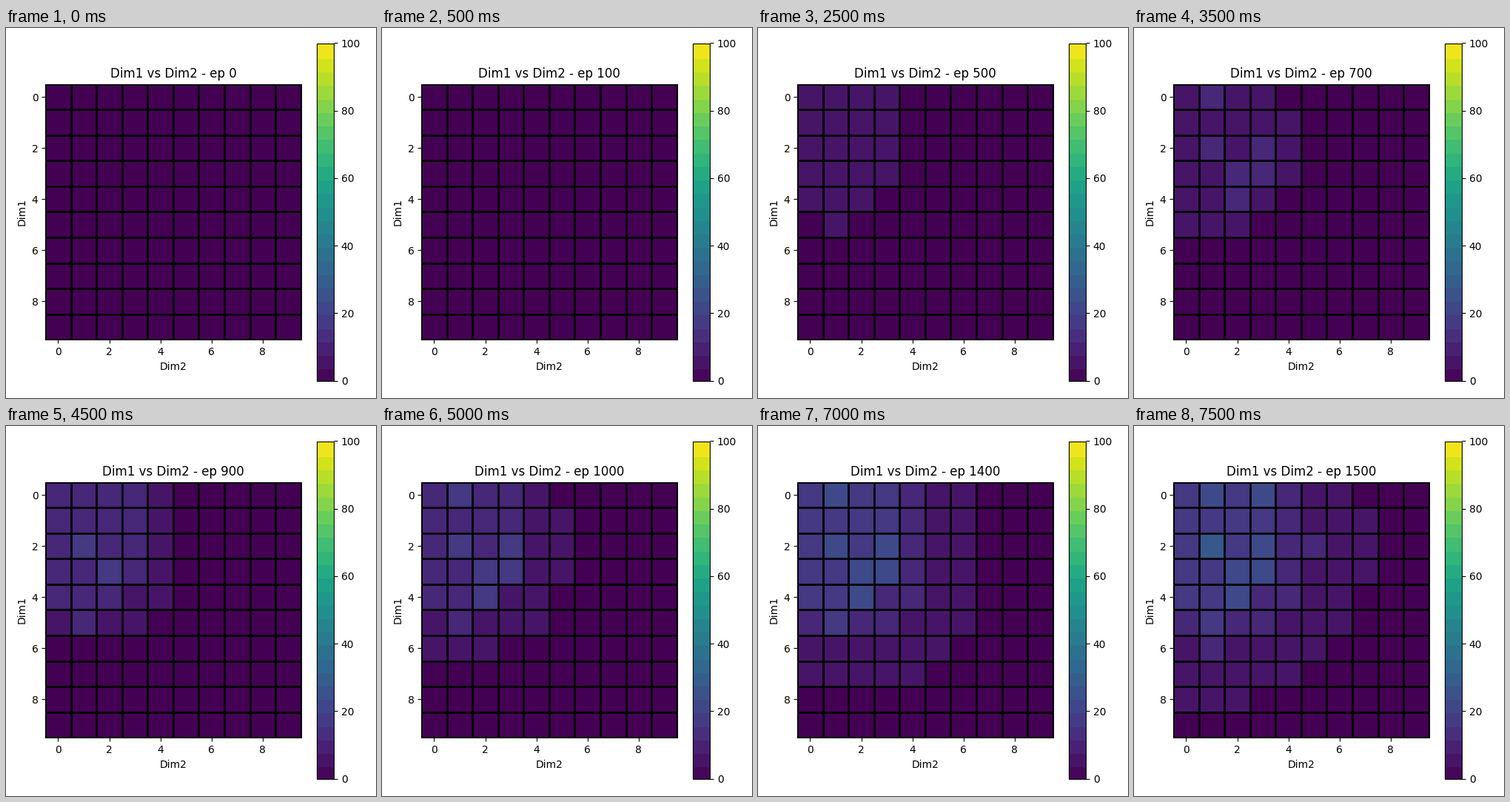
Animation, 500 px wide and 500 px high, one loop 8 s. Source, as a matplotlib script:

```python
import numpy as np
import matplotlib.pyplot as plt
from matplotlib.animation import FuncAnimation

N = 10
STEPS = 16
LEVEL = 5.5  # percent gained at each rise
FAVOURED = [(2, 1), (0, 1), (0, 3), (2, 3), (3, 2), (3, 3), (4, 2), (5, 1)]

# Cells light up along a front that spreads from row 2, column 1,
# then rise again at a pace that slows with distance.
row, col = np.mgrid[:N, :N]
dist = np.hypot(row - 2, col - 1)
lag = 2.65 * np.maximum(dist - 1.7, 0)
start = 3 + lag
pace = 4 + dist ** 2 / 10

# Favoured cells start sooner and rise faster
hot = tuple(np.transpose(FAVOURED))
start[hot] = 2 + 0.4 * lag[hot]
pace[hot] *= 0.8


def heat(step):
    rises = 1 + np.floor((step - start) / pace)
    return LEVEL * np.maximum(rises, 0)


plt.rcParams["font.family"] = "DejaVu Sans"
fig, ax = plt.subplots(figsize=(5, 5), dpi=100, facecolor="white")
image = ax.imshow(heat(0), cmap="viridis", vmin=0, vmax=100,
                  interpolation="nearest")
ax.set_xticks(range(0, N, 2))
ax.set_yticks(range(0, N, 2))
edges = np.arange(-0.5, N)
ax.set_xticks(edges, minor=True)
ax.set_yticks(edges, minor=True)
ax.tick_params(which="minor", length=0)
ax.grid(which="minor", color="black", linewidth=2)
ax.set_xlabel("Dim2")
ax.set_ylabel("Dim1")
title = ax.set_title("Dim1 vs Dim2 - ep 0")

# Stepped colour scale
bands = np.concatenate([[0], np.arange(3.3, 96, 4), [100]])
fig.colorbar(image, ax=ax, boundaries=bands, spacing="proportional",
             ticks=range(0, 101, 20))
fig.tight_layout()


def update(step):
    image.set_data(heat(step))
    title.set_text(f"Dim1 vs Dim2 - ep {100 * step}")
    return image, title


anim = FuncAnimation(fig, update, frames=STEPS, interval=500,
                     repeat=True, repeat_delay=0)
plt.show()
```
